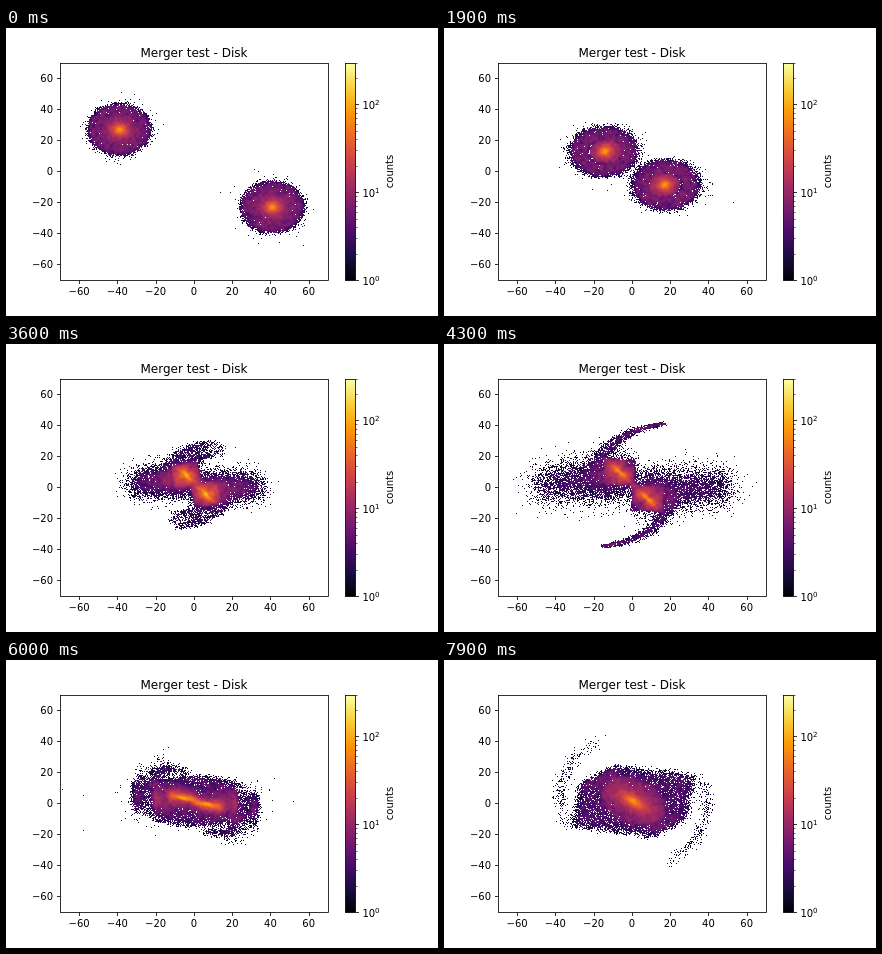
An HTML page with a canvas for the animation above (8 s loop, 432 by 288 pixels).

```html
<!DOCTYPE html>
<html lang="en">
<head>
<meta charset="utf-8">
<title>Merger test - Disk</title>
<style>
  html, body { margin: 0; width: 100%; height: 100%; overflow: hidden; background: #fff; }
  canvas, svg { position: absolute; left: 0; top: 0; }
  canvas { left: 54px; top: 35px; }
  svg { width: 432px; height: 288px; }
  text { font: 10px "DejaVu Sans", sans-serif; fill: #000; }
  .title { font-size: 12px; }
  .sup { font-size: 7px; }
  path, rect { fill: none; stroke: #000; stroke-width: .8; }
  .minor { stroke-width: .6; }
</style>
</head>
<body>
<canvas id="plot" width="268" height="217"></canvas>
<svg id="axes" viewBox="0 0 432 288">
  <defs><linearGradient id="ramp" x1="0" y1="1" x2="0" y2="0"></linearGradient></defs>
</svg>
<script>
const LOOP = 8000, STEP = 100, LIMIT = 70, VMAX = 300;
const BOX = { left: 54, width: 267.84, height: 217.44, bottom: 252 };
const INFERNO = ['000004', '1b0c41', '4a0c6b', '781c6d', 'a52c60',
                 'cf4446', 'ed6925', 'fb9b06', 'f7d13d', 'fcffa4'];

// ---- axes and colour bar ----
const svg = document.getElementById('axes');
function add(parent, tag, attrs, label) {
  const el = document.createElementNS('http://www.w3.org/2000/svg', tag);
  for (const k in attrs) el.setAttribute(k, attrs[k]);
  if (label) el.textContent = label;
  parent.appendChild(el);
  return el;
}
const snap = v => Math.floor(v + .5) + .5;
const text = (x, y, label, anchor = 'start', cls = '') =>
  add(svg, 'text', { x, y: Math.round(y), 'text-anchor': anchor, class: cls }, label);

function drawAxes() {
  add(svg, 'rect', { x: 54.5, y: 35.5, width: 268, height: 217 });
  for (let v = -60; v <= 60; v += 20) {
    const label = String(v).replace('-', '\u2212');
    const x = BOX.left + (v + LIMIT) / (2 * LIMIT) * BOX.width;
    const y = BOX.bottom - (v + LIMIT) / (2 * LIMIT) * BOX.height;
    add(svg, 'path', { d: `M${snap(x)} 252.5v3.5M54.5 ${snap(y)}h-3.5` });
    text(x, 267, label, 'middle');
    text(47, y + 3.8, label, 'end');
  }
  text(188, 29, 'Merger test - Disk', 'middle', 'title');

  const ramp = document.getElementById('ramp');
  INFERNO.forEach((c, i) => add(ramp, 'stop', { offset: i / 9, 'stop-color': '#' + c }));
  add(svg, 'rect', { x: 339.5, y: 35.5, width: 10, height: 217, style: 'fill:url(#ramp)' });
  for (let e = 0; e < 3; e++) {
    for (let m = 1; m < 10 && m * 10 ** e <= VMAX; m++) {
      const y = BOX.bottom - Math.log(m * 10 ** e) / Math.log(VMAX) * BOX.height;
      add(svg, 'path', { d: `M349.5 ${snap(y)}h${m > 1 ? 2 : 3.5}`, class: m > 1 ? 'minor' : '' });
      if (m === 1) {
        text(356.5, y + 4.6, '10');
        text(369, y + .8, String(e), 'start', 'sup');
      }
    }
  }
  text(0, 0, 'counts', 'middle').setAttribute('transform', 'translate(387 143.5) rotate(-90)');
}

// ---- particles ----
let seed = 20177;
function rand() {
  seed = seed + 0x6D2B79F5 | 0;
  let z = Math.imul(seed ^ seed >>> 15, 1 | seed);
  z = z + Math.imul(z ^ z >>> 7, 61 | z) ^ z;
  return ((z ^ z >>> 14) >>> 0) / 4294967296;
}
const { sin, cos, abs, sqrt, sign, max, min, floor, log, PI } = Math;
const expo = () => -log(1 - rand());
const gauss = () => sqrt(2 * expo()) * cos(2 * PI * rand());

// a peaked bulge inside a flat disk with a thin halo of strays
function radius() {
  if (rand() < .28) return 2 * (expo() + expo());
  const r = abs(16.3 * rand() ** .6 + gauss());
  return rand() < .05 ? r + 2.5 * expo() : r;
}

const stars = Array.from({ length: 30000 }, (_, i) => ({
  side: i % 2 ? 1 : -1,
  r: radius(), a: 2 * PI * rand(), u: rand(), e: expo(), g: gauss(), h: gauss()
}));

const CORE = 8;

function bezier(w, ax, ay, bx, by, cx, cy) {
  const k = 1 - w;
  return [k * k * ax + 2 * k * w * bx + w * w * cx, k * k * ay + 2 * k * w * by + w * w * cy];
}
// offset (along, across) from a centre, in a frame tilted down to the right
const tilted = (cx, cy, along, across, c, s) =>
  [cx + along * c + across * s, cy - along * s + across * c];
const blur = (p, [x, y], amount) => [x + p.g * amount, y + p.h * amount];

// ---- poses: where a star stands at each key time ----
const disk = (ax, ay, bx, by) => (p, a) => {
  const first = p.side < 0;
  return [(first ? ax : bx) + p.r * cos(a), (first ? ay : by) + p.r * sin(a)];
};

function overlap(p, a) {
  const c = cos(a), wing = max(0, p.r - 16);
  return [1.5 + 2.5 * p.side + p.r * c + sign(c) * wing,
          2.2 - p.side + .85 * min(p.r, 16.5) * sin(a)];
}

function apart(p, a) {
  if (p.r < CORE) {
    const q = p.r / CORE, c = cos(a), s = sin(a), n = (abs(c) + abs(s)) ** 1.3;
    return tilted(-6.5, 10, 12.5 * q ** .6 * c / n, 12 * q ** 1.5 * s / n, .67, .74);
  }
  if (p.u < .2) {
    const w = (p.u * 5) ** 1.3;
    return blur(p, bezier(w, -20, 8, -14, 36, 17, 41), 2.4 * (1 - w) + .5);
  }
  const far = (p.u - .2) / .8;
  return [-6 - 42 * far * far + 5 * p.g, 8 - 6 * far + 7 * p.h];
}

function swirl(p, a) {
  if (p.r < CORE) {
    const turn = abs(a / PI % 2 - 1);
    const x = p.r < 4 ? 12 * (2 * turn - 1) : (12 + .3 * p.r) * cos(a);
    return [1 + x + .4 * p.h, 1.3 - 2.8 * Math.tanh(x / 3.5) + p.g * (.35 + .08 * p.r * p.r)];
  }
  if (p.u < .2) {
    const w = (p.u * 5) ** 3;
    return blur(p, bezier(w, -17, 6, -16, 22, 14, 41), 2);
  }
  if (p.u > .985) return [-20 - 14 * p.e, 2 + 10 * p.g];
  const k = sqrt((p.u - .2) / .785);
  return blur(p, [2 + 21 * k * cos(a), 2 + 13 * k * sin(a)], 1);
}

function shells(p, a) {
  if (p.r < CORE) {
    const q = p.r / CORE;
    return tilted(1, 2.2, 16 * q ** .9 * cos(a), 12 * q ** 1.4 * sin(a), .88, .47);
  }
  if (p.u < .08) return blur(p, bezier((p.u / .08) ** 1.3, -30, 12, -18, 42, 6, 27), 1.8);
  if (p.u < .45) {
    const depth = (p.u - .08) / .37;
    return [-37 + 18 * depth ** 1.2 + .5 * p.g, 3 + 8 * p.h];
  }
  const k = sqrt((p.u - .45) / .55);
  return blur(p, [1 + 24 * k * cos(a), 2 + 17 * k * sin(a)], 1.4);
}

const HULL = [[-27, 11], [-10, 22], [31, 15.5], [27, -11]];
function box(p, a) {
  if (p.r < CORE) {
    const q = p.r / CORE;
    return tilted(1, 2.3, 18 * q * cos(a), 14 * q ** 1.4 * sin(a), .8, .6);
  }
  if (p.u < .035) return blur(p, bezier(p.u / .035, -34, -14, -46, 18, -18, 41), 2);
  const turn = a / PI % 2, f = turn % 1 * 3, i = floor(f), w = f - i;
  const k = sqrt((p.u - .035) / .965) * (turn < 1 ? 1 : -1);
  const [x0, y0] = HULL[i], [x1, y1] = HULL[i + 1];
  return blur(p, [2 + k * (x0 + (x1 - x0) * w), 2.5 + k * (y0 + (y1 - y0) * w)], 1.2);
}

// after the passage the two halves mirror each other through the centre
const mirrored = pose => (p, a) => {
  if (p.side > 0) return pose(p, a);
  const [x, y] = pose(p, a + PI);
  return [1.5 - x, 3 - y];
};

const TIMES = [0, 1100, 2700, 4300, 5200, 6700, 7900];
const POSES = [disk(-39, 27, 41, -23), disk(-28, 22.5, 31, -18.5), overlap,
               ...[apart, swirl, shells, box].map(mirrored)];

// smooth spline weights of the four poses around time t
function blend(t) {
  const last = TIMES.length - 1;
  let i = 0;
  while (i < last - 1 && t >= TIMES[i + 1]) i++;
  const ids = [max(0, i - 1), i, i + 1, min(last, i + 2)];
  const [ta, tb, tc, td] = ids.map(k => TIMES[k]);
  const h = tc - tb, f = (t - tb) / h, end = f * f * (3 - 2 * f);
  const m0 = f * (1 - f) ** 2 * h / (tc - ta), m1 = f * f * (f - 1) * h / (td - tb);
  return [-m0, 1 - end - m1, end + m0, m1]
    .map((weight, k) => ({ weight, pose: POSES[ids[k]] }))
    .filter(part => abs(part.weight) > 1e-6);
}

// ---- histogram ----
const GAIN = 1.5;
const rgb = INFERNO.map(c => [0, 2, 4].map(k => parseInt(c.slice(k, k + 2), 16)));
function colour(n) {
  const v = min(1, log(GAIN * n) / log(VMAX)) * 9, i = min(8, floor(v));
  return rgb[i].map((c, k) => c + (rgb[i + 1][k] - c) * (v - i));
}

const plot = document.getElementById('plot'), ctx = plot.getContext('2d');
const W = plot.width, H = plot.height;
const image = ctx.createImageData(W, H);
const counts = new Uint16Array(W * H);
const toBin = (v, size) => floor((v + LIMIT) / (2 * LIMIT) * size);

// mean of the filled cells around cell i
function local(i) {
  let sum = 0, cells = 0;
  for (let dy = -W; dy <= W; dy += W) {
    for (let dx = -1; dx <= 1; dx++) {
      const n = counts[i + dy + dx];
      if (n) { sum += n; cells++; }
    }
  }
  return sum / cells;
}

function draw(t) {
  const parts = blend(t);
  counts.fill(0);
  for (const p of stars) {
    const a = p.a + t / 1000 * 8 / (p.r + 3);
    let x = 0, y = 0;
    for (const { weight, pose } of parts) {
      const at = pose(p, a);
      x += weight * at[0];
      y += weight * at[1];
    }
    const col = toBin(x, W), row = toBin(-y, H);
    if (col >= 0 && col < W && row >= 0 && row < H) counts[row * W + col]++;
  }
  image.data.fill(0);
  counts.forEach((n, i) => {
    if (!n) return;
    image.data.set(colour(local(i)), i * 4);
    image.data[i * 4 + 3] = 255;
  });
  ctx.putImageData(image, 0, 0);
}

let shown = -1;
function tick() {
  const step = floor(performance.now() % LOOP / STEP);
  if (step !== shown) draw((shown = step) * STEP);
  requestAnimationFrame(tick);
}
drawAxes();
tick();
</script>
</body>
</html>
```
